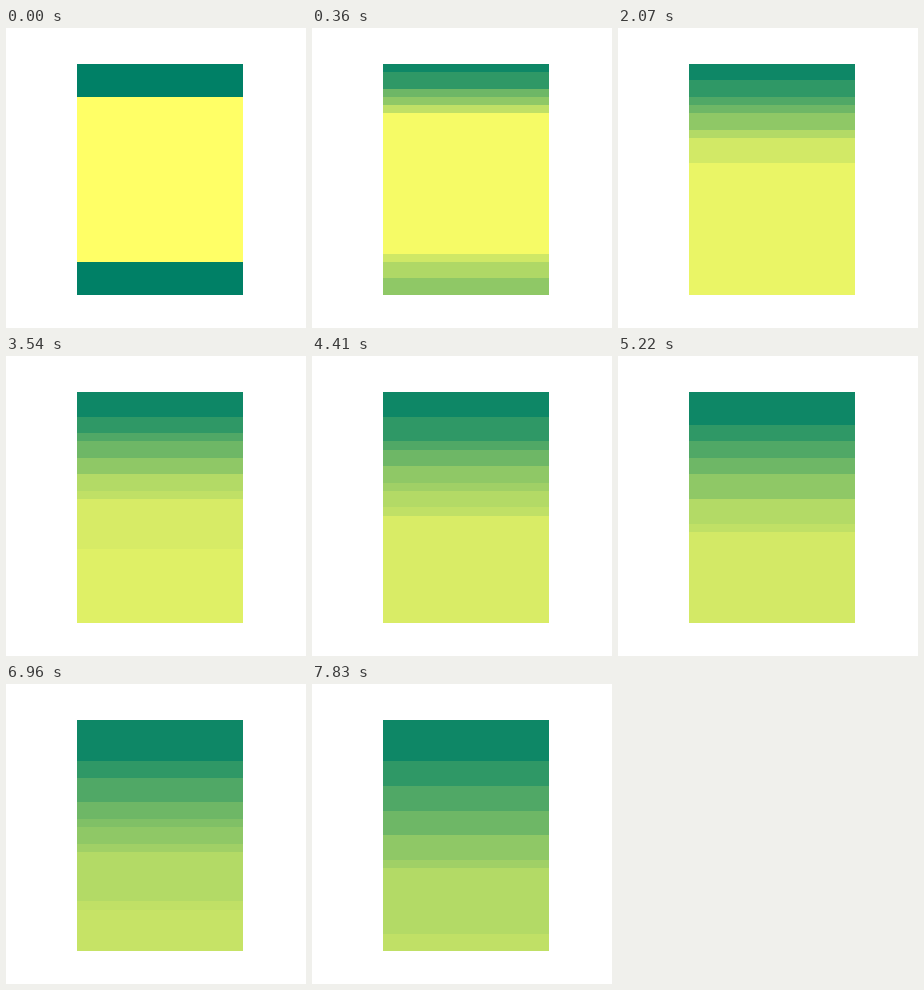
An HTML page for the animation above (8 s loop, 300 px wide and 300 px high).

```html
<!DOCTYPE html>
<html lang="en">
<head>
<meta charset="utf-8">
<title>Cooling column</title>
<style>
  html, body { margin: 0; width: 100%; height: 100%; overflow: hidden; background: #fff; }
  svg { display: block; width: 100vw; height: 100vh; }
</style>
</head>
<body>
<svg id="stage" viewBox="0 0 300 300" shape-rendering="crispEdges"></svg>
<script>
const LOOP = 8000, STEP = 30;
const CELLS = 28, COLD_CELLS = 4;
const TOP = 36, LEFT = 71, WIDTH = 166, PITCH = 8.25;

// Each tone and its relative warmth: warmer tones start deeper and sink faster.
const tones = [[47, 0], [80, 0.25], [110, 0.48], [128, 0.72], [143, 0.733], [160, 0.95], [179, 1]];

const stage = document.getElementById('stage');
const cellTop = i => Math.ceil(TOP + PITCH * i - 0.5);
const summer = red => `rgb(${Math.round(red)},${Math.round(128 + red / 2)},102)`;

const cells = Array.from({ length: CELLS }, (_, i) => {
  const rect = document.createElementNS('http://www.w3.org/2000/svg', 'rect');
  const box = { x: LEFT, y: cellTop(i), width: WIDTH, height: cellTop(i + 1) - cellTop(i) };
  for (const key in box) rect.setAttribute(key, box[key]);
  return stage.appendChild(rect);
});

function erf(x) {
  const z = Math.abs(x);
  const q = 1 + z * (0.278393 + z * (0.230389 + z * (0.000972 + z * 0.078108)));
  return Math.sign(x) * (1 - 1 / q ** 4);
}

const toneDepth = (p, t) => 1.05 + 3.85 * p ** 0.59 + (0.6 + 0.45 * p + 0.64 * p * p) * t;

// The cold slab at the bottom spreads and fades within the first second.
function bottomRed(depth, t) {
  const spread = 4.65 * Math.sqrt(t);
  const slab = (erf((COLD_CELLS - depth) / spread) + erf((COLD_CELLS + depth) / spread)) / 2;
  return 255 * (1 - slab * Math.max(0, 1 - t / 0.99) ** 1.72);
}

// Red value of every cell after t seconds, from top to bottom.
function profile(t) {
  const settle = Math.min(1, Math.sqrt(t / 0.36));
  const warm = 255 - 6 * settle - 7.3 * t;
  const reds = cells.map(() => 14 * settle);
  const paint = (red, depth) =>
    reds.fill(red, Math.floor(COLD_CELLS + (depth - COLD_CELLS) * settle));

  tones.forEach(([red, p]) => paint(red, toneDepth(p, t)));
  const shelf = 5.2 + 1.81 * t + 0.014 * t ** 3;
  paint(192, shelf);
  paint(Math.min(warm, 204 + 3 * t), shelf + 0.85);
  paint(warm, 4.82 + 3.3 * t + 0.2 * t * t);

  for (let i = CELLS / 2; i < CELLS; i++) {
    const red = bottomRed(CELLS - i - 0.5, t);
    if (red < 224) reds[i] = Math.max(0, 32 * Math.ceil(red / 32) - 17);
  }
  return reds;
}

function render(ms) {
  const t = Math.floor(ms / STEP) * STEP / 1000;
  profile(t).forEach((red, i) => cells[i].setAttribute('fill', summer(red)));
}

const start = performance.now();
function frame() {
  render((performance.now() - start) % LOOP);
  requestAnimationFrame(frame);
}
frame();
</script>
</body>
</html>
```
